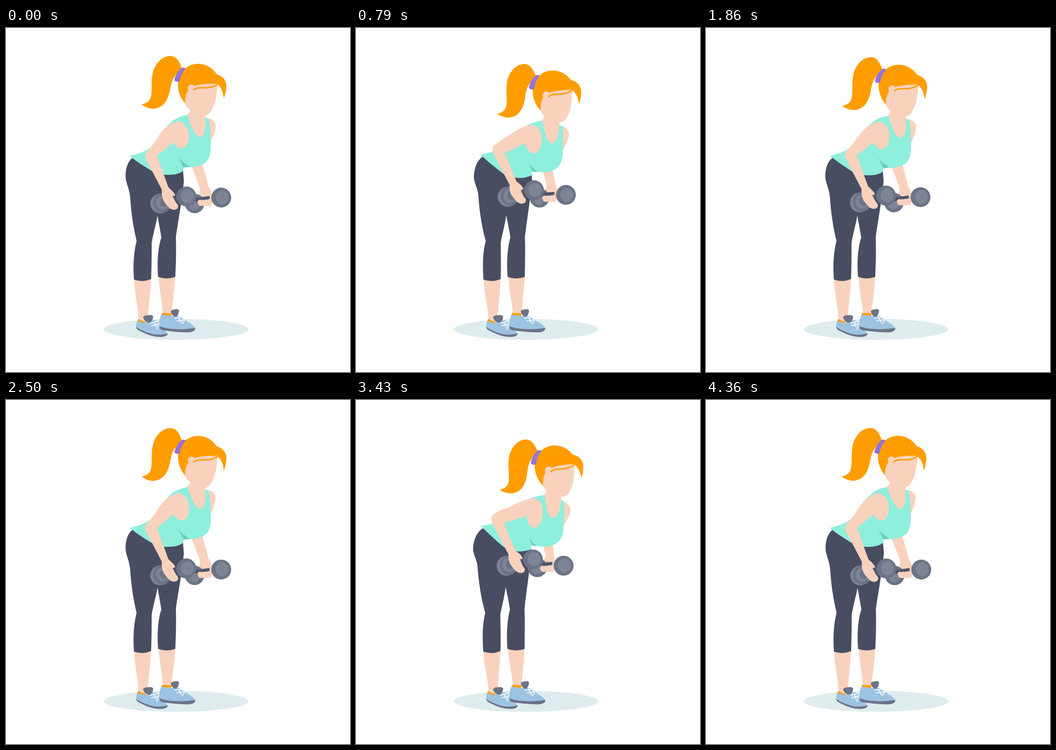
An HTML page that plays this animation: 640 by 640 pixels, repeating every 4430 ms.

```html
<!DOCTYPE html>
<html lang="en">
<head>
<meta charset="utf-8">
<title>Bent-over row</title>
<style>
  html, body { margin: 0; width: 100%; height: 100%; overflow: hidden; background: #fff; }
  svg { display: block; width: 100%; height: 100%; }
  .skin { fill: #f9d2be; }
  .hair { fill: #ff9d00; }
  .top { fill: #8eefdc; }
  .fold { fill: #6bcdb9; }
  .pants { fill: #484d62; }
  .shoe { fill: #9cc3e1; }
  .iron { fill: #6c7386; }
  .shine { fill: #7d8495; }
  .line { fill: none; stroke-linecap: round; }
  .bar { fill: none; stroke: #50566a; stroke-width: 9; }
  .thin { stroke-width: 7; }
  .lace { stroke: #eef4fa; stroke-width: 2; }
</style>
</head>
<body>
<svg viewBox="0 0 640 640">
  <ellipse cx="316.5" cy="560.5" rx="134.5" ry="19.5" fill="#dfeced"/>

  <!-- lower legs and shoes -->
  <path class="skin" d="M238 462 C239 495 246 520 247 547 L264 547 C264 520 269 495 270 462 Z"
    data-bent="M237 462 C238 495 246 520 247 547 L264 547 C264 520 268 495 269 462 Z"/>
  <path class="skin" d="M284 458 C285 490 291 510 292 536 L308 536 C309 510 314 490 315 458 Z"
    data-bent="M283 458 C284 490 291 510 292 536 L308 536 C309 510 313 490 314 458 Z"/>
  <path class="hair" d="M246 541 Q251 545 260 547 L258 551 L244 546 Z"/>
  <path class="shoe" d="M244 545 C242 550 242 555 243 558 C252 564 263 569 273 571 C284 573 297 573 300 568 C297 563 290 558 286 551 C282 545 277 543 272 544 L258 549 Z"/>
  <path class="iron" d="M242 556 C250 562 262 567 275 570 C285 571 295 570 301 568 Q301 573 292 574.500 C275 576 262 570 252 565 Q242 561 242 556 Z"/>
  <path class="iron" d="M255 538 Q257 534 264 534.500 Q272 533 274 537 Q273 545 268 548 Q258 549 255 538 Z"/>
  <path class="line lace" d="M269 549 L282 546 M271 554 L285 550 M276 548 L279 556 M281 561 L283 552"/>
  <path class="hair" d="M290 530 L308 531 L307 536 L290 534 Z"/>
  <path class="shoe" d="M289 533 C285 542 285 550 286 557 C300 563 317 563 335 564 C345 564 352 561 352 558 C347 550 336 546 328 540 C324 536 321 535 318 536 L307 536 Z"/>
  <path class="iron" d="M286 555 C300 561 330 562 352 558 Q353 564 343 566 C325 567 303 564 290 562 Q285 560 286 555 Z"/>
  <path class="iron" d="M306.500 527 Q309 523 315 523.500 Q321 522 322 526 Q321 534 317 537 Q309 538 306.500 527 Z"/>
  <path class="line lace" d="M314 540 L327 538 M318 545 L332 543 M321 538 L326 548 M328 550 L332 545"/>

  <!-- far arm -->
  <path class="skin" d="M370 167 C385 168 391 175 390 185 C388 196 385 204 379 214 Z"
    data-bent="M379 183 C393 187 399 194 397 204 C394 214 391 221 384 231 Z"/>
  <path class="skin" d="M342 250 L358 290 C361 297 363 304 356 318 L384 321 C385 310 382 303 377 295 L364 248 Z"
    data-bent="M346 262 L353 287 C355 293 353 298 345 310 L373 313 C374 302 372 297 370 289 L365 262 Z"/>

  <path class="pants"
    d="M236 241 C224 250 221 268 223 282 C225 292 230 302 231 315 C233 345 237 372 243 396 C238 415 236 440 238 468 Q254 474 270 467 C271 440 271 420 271 399 C274 382 279 366 282 349 C284 362 287 376 289 390 C282 410 281 440 283 463 Q299 469 315 463 C316 440 317 415 316 389 C320 360 327 325 331 285 L329 262 Z"
    data-bent="M236 239 C222 248 218 268 219 280 C220 290 226 298 227 310 C229 340 234 372 241 396 C236 415 235 440 237 468 Q253 474 269 467 C270 440 269 420 269 399 C272 382 277 366 279 348 C282 362 285 376 287 390 C281 410 280 440 282 463 Q298 469 314 463 C314 440 315 415 314 389 C317 360 323 325 327 285 L326 266 Z"/>

  <!-- neck and torso -->
  <path class="skin" d="M343 146 C344 155 340 160 333 164 L346 202 L362 207 L373 190 L370 150 Z"
    data-bent="M352 160 C353 168 350 172 344 175 L351 212 L364 219 L381 203 L379 166 Z"/>
  <path class="top"
    d="M338 162 C318 164 308 174 299 183 C285 198 280 213 268 223 C256 231 243 235 230 238 C245 250 257 257 268 264 C280 272 295 274 306 273 C316 273 324 270 329 266 L331 259 C345 260 360 258 370 251 C381 243 381 228 381 212 C381 195 379 180 377 169 Q374 166 370 168 C373 182 370 203 361 203 C351 201 343 180 338 162 Z"
    data-bent="M348 174 C334 175 322 181 311 187 C292 200 290 215 277 222 C260 229 245 233 232 235 C244 247 258 259 268 267 C278 276 290 280 303 280 C313 280 321 278 327 275 L327 268 C345 271 360 271 370 265 C383 257 385 245 385 232 C386 215 386 200 386 186 Q383 182 379 184 C379 198 375 216 364 216 C354 213 353 195 348 174 Z"/>
  <path class="fold" d="M320 240 C326 248 334 253 341 257 Q336 260 330 259 Q326 250 320 240 Z"
    data-bent="M320 248 C323 256 330 264 337 268 Q333 270 328 268 Q324 258 320 248 Z"/>

  <!-- far dumbbell -->
  <g data-shift="-11 -12">
    <ellipse class="iron" cx="351" cy="326.500" rx="18" ry="18"/>
    <ellipse class="shine" cx="350" cy="327" rx="11" ry="12"/>
  </g>
  <path class="bar thin" d="M352 320 L379 316" data-bent="M341 309 L368 307"/>
  <g class="skin" data-shift="-11.5 -9">
    <rect x="358" y="322" width="25" height="9" rx="4"/>
    <circle cx="361" cy="324" r="4.500"/><circle cx="367" cy="324.500" r="5"/>
    <circle cx="373" cy="324" r="5"/><circle cx="379" cy="323" r="5"/>
  </g>
  <g data-shift="-11.5 -5.8">
    <circle class="iron" cx="400.500" cy="315.500" r="18.500"/>
    <ellipse class="shine" cx="402" cy="315" rx="12" ry="13"/>
  </g>

  <!-- near dumbbell and arm -->
  <g data-shift="-5.5 -14.5">
    <circle class="shine" cx="287" cy="326.500" r="18.500"/>
    <ellipse class="iron" cx="291" cy="325.500" rx="17" ry="18"/>
    <ellipse class="shine" cx="291" cy="325" rx="12" ry="13"/>
    <ellipse class="iron" cx="294" cy="324" rx="8" ry="9"/>
  </g>
  <path class="bar" d="M294 323 L332 313" data-bent="M289 309 L327 300"/>
  <path class="skin"
    d="M322 173 C338 178 342 194 340 207 C339 217 333 224 327 224 C320 224 314 217 311 213 L281 238 L302 296 C308 302 313 306 315 311 C313 313 311 312 310 313 C313 319 316 325 319 328 C322 332 320 337 315 338 C308 339 303 335 298 328 C292 322 289 312 290 301 L264 251 C258 241 257 234 264 228 C271 221 280 207 288 195 C297 184 308 175 322 173 Z"
    data-bent="M331 181 C345 186 347 200 346 212 C345 224 340 234 331 235 C324 235 317 226 316 215 L276 231 L298 284 C304 288 309 292 311 298 C309 300 307 299 306 300 C309 306 311 312 314 315 C317 319 315 324 310 325 C303 326 298 322 293 315 C287 309 284 299 285 290 L256 235 C252 226 252 220 258 215 C268 208 278 203 289 197 C302 188 316 182 331 181 Z"/>
  <g data-shift="-5 -13.5">
    <circle class="iron" cx="335.500" cy="313.500" r="18.500"/>
    <ellipse class="shine" cx="337.500" cy="313" rx="12" ry="13"/>
  </g>

  <g id="head">
    <path class="hair" d="M327 75 C322 60 316 52 306 52 C290 52 278 66 273.500 82 C269 98 273 117 269 130 C266 138 259 141 252 142 C259 148 269 151 277 150 C291 148 300 137 304 120 C307 106 308 97 315 89 Z"/>
    <path class="hair" d="M320 102 C322 80 338 67 357 66.500 C375 67 385 76 392 86 C404 89 411 99 410 110 C409 119 408 125 405 131 C404 119 401 112 394 105 L345 150 L333 140 C324 130 319 116 320 102 Z"/>
    <path class="skin" d="M333 140 C333 127 336 118 343 112 C354 104 375 103.500 394 104 C392 122 391 135 385 148 C380 159 374 164 367 163 C358 163 350 158 343 153 C338 149 334 145 333 140 Z"/>
    <circle class="skin" cx="345" cy="112" r="7"/>
    <path class="line" d="M349 115 C356 109 367 112 376 111 C383 110 389 108 393 105" stroke="#ff9d00" stroke-width="2.500"/>
    <path fill="#9673d8" d="M326 75 Q330 72 334 75 C328 83 324 91 323 99 Q317 102 313 97 C315 88 320 80 326 75 Z"/>
  </g>
</svg>
<script>
  const LOOP = 4430, REP = LOOP / 2;
  const STEP = 71.25, FIRST_STEP = 286;
  const START = 220, DURATION = 1820, DEPTH = 1.265;

  const head = document.getElementById('head');
  const numbers = text => text.match(/-?[\d.]+/g).map(Number);

  const shapes = [...document.querySelectorAll('[data-bent]')].map(el => ({
    el, commands: el.getAttribute('d'),
    tall: numbers(el.getAttribute('d')), bent: numbers(el.dataset.bent)
  }));
  const weights = [...document.querySelectorAll('[data-shift]')].map(el => ({
    el, shift: numbers(el.dataset.shift)
  }));

  // The movement advances in fixed steps; each loop holds two repetitions.
  function bendAt(ms) {
    const step = Math.floor((ms % LOOP - FIRST_STEP) / STEP);
    const time = FIRST_STEP + step * STEP;
    const u = ((time + REP) % REP - START) / DURATION;
    return u <= 0 || u >= 1 ? 0 : DEPTH * (1 - Math.cos(2 * Math.PI * u)) / 2;
  }

  function draw(bend) {
    for (const { el, commands, tall, bent } of shapes) {
      let i = 0;
      el.setAttribute('d', commands.replace(/-?[\d.]+/g, () => {
        const value = tall[i] + (bent[i] - tall[i]) * bend;
        i++;
        return value.toFixed(2);
      }));
    }
    for (const { el, shift: [x, y] } of weights)
      el.setAttribute('transform', `translate(${x * bend} ${y * bend})`);
    head.setAttribute('transform',
      `translate(${10.2 * bend} ${15.3 * bend}) rotate(${-3.2 * bend} 340 105)`);
  }

  const origin = performance.now();
  function tick() {
    draw(bendAt(performance.now() - origin));
    requestAnimationFrame(tick);
  }
  tick();
</script>
</body>
</html>
```
